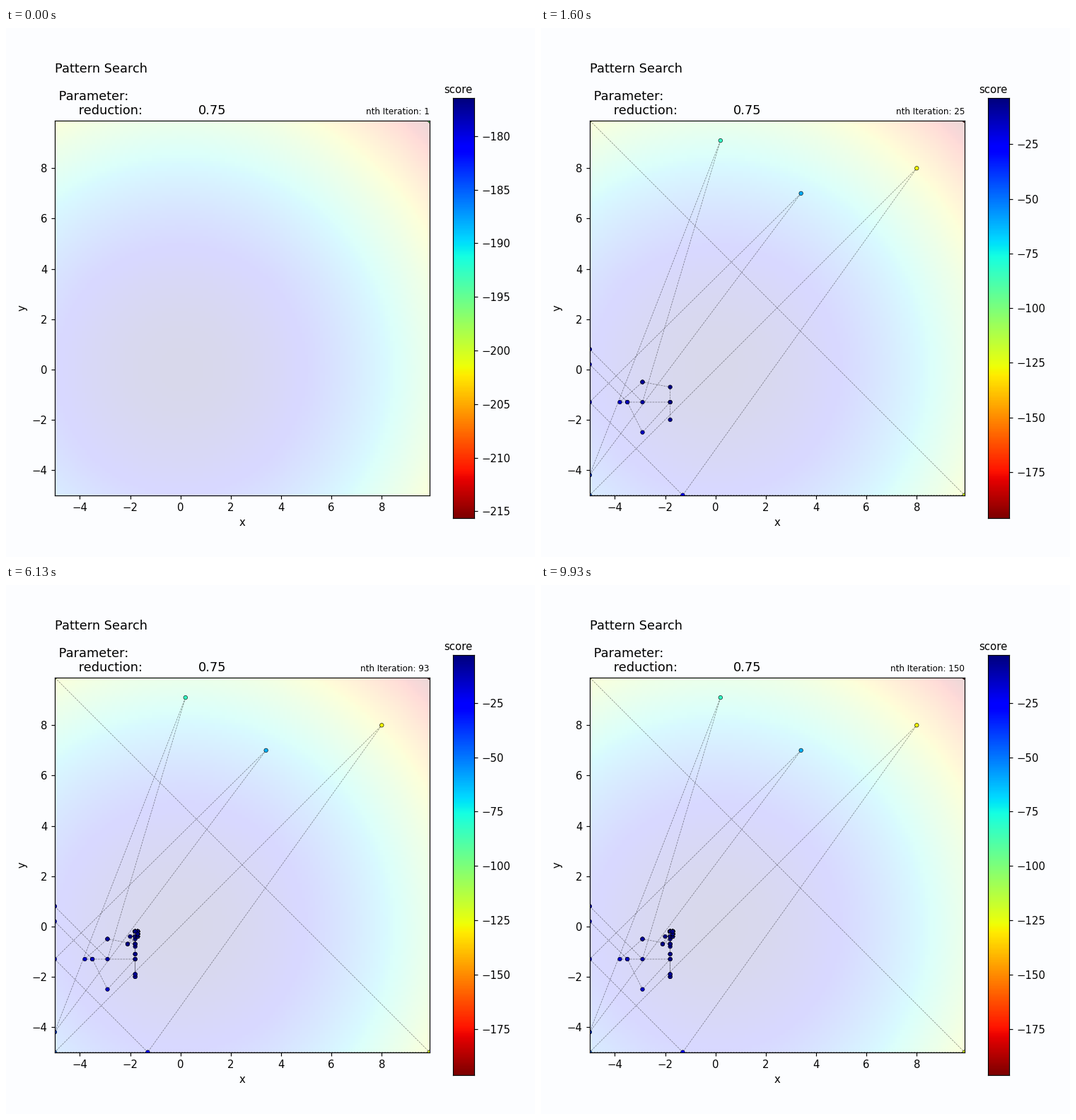
Animation of 748x748 px, one loop 9990 ms. Source, as a matplotlib script:

```python
import random

import matplotlib.pyplot as plt
import numpy as np
from matplotlib.animation import FuncAnimation

SIZE = 748
STEPS = 150
LOOP_MS = 9990
HOLD = 129          # step that stays for two ticks
CELLS = 150         # search grid, 0.1 apart
LOW, HIGH = -5, 9.9
REDUCTION = 0.75
PAPER = "#fcfdff"
CMAP = plt.get_cmap("jet_r")
MOVES = {"l": (-1, 0), "r": (1, 0), "d": (0, -1), "u": (0, 1)}


def to_xy(cells):
    return np.asarray(cells) * 0.1 + LOW


def score(cell):
    return -(to_xy(cell) ** 2).sum()


def search_path():
    """Pattern search: probe around the best cell with a shrinking reach."""
    last = CELLS - 1
    path = [(last, last), (0, last), (last, 0), (0, 0), (130, 130)]
    strays = [(84, 120), (52, 141)]
    turns = "ru dd ru ur dr lu ud ud ud ul ud lr rd".split()
    rng = random.Random(4)
    reach = CELLS / 4
    while len(path) < STEPS:
        # the newest probes are not judged yet; the latest of equals wins
        known = path[:max(7, len(path) - 3)]
        bx, by = max(reversed(known), key=score)
        for turn in turns.pop(0) if turns else rng.sample("lrdu", 2):
            dx, dy = MOVES[turn]
            probe = np.clip([bx + dx * reach, by + dy * reach], 0, last)
            path.append(tuple(probe.astype(int)))
        path.append(strays.pop(0) if strays else path[-1])
        reach *= REDUCTION
    return path[:STEPS]


def add_axes(left, top, right, bottom):
    """Axes placed by pixel edges measured from the top left."""
    return fig.add_axes([left / SIZE, 1 - bottom / SIZE,
                         (right - left) / SIZE, (bottom - top) / SIZE])


def pixel_text(x, y, text, **style):
    return fig.text(x / SIZE, 1 - y / SIZE, text, va="baseline", **style)


cells = search_path()
points = to_xy(cells)
scores = np.array([score(c) for c in cells])

plt.rcParams["font.family"] = "DejaVu Sans"
fig = plt.figure(figsize=(7, 7), dpi=SIZE / 7, facecolor=PAPER)

# Faint score landscape
ax = add_axes(68.8, 130.7, 598.9, 660.6)
grid = np.linspace(LOW, HIGH, CELLS)
height = grid[:, None] ** 2 + grid[None, :] ** 2
tint = 0.85 + 0.15 * CMAP(1 - height / height.max())[..., :3]
ax.imshow(tint, origin="lower", extent=(LOW, HIGH, LOW, HIGH),
          aspect="auto", interpolation="nearest")
ax.set_xlim(LOW, HIGH)
ax.set_ylim(LOW, HIGH)
ax.set_xlabel("x")
ax.set_ylabel("y")
counter = ax.set_title("", loc="right", fontsize=8)

heading = ["Pattern Search", "", " Parameter:", "      reduction:"]
for row, line in enumerate(heading):
    pixel_text(69, 62.8 + 19.75 * row, line, fontsize=12)
pixel_text(272, 122, str(REDUCTION), fontsize=12)

trail, = ax.plot([], [], "--", color="black", lw=0.5, alpha=0.45, zorder=2)
dots = ax.scatter([], [], s=14, c=[], cmap=CMAP, edgecolors="black",
                  linewidths=0.4, zorder=2.2)

# Score scale
bar = add_axes(631.9, 98.7, 662, 692.7)
ramp = bar.imshow(np.linspace(0, 1, 256)[:, None], cmap=CMAP, origin="lower",
                  extent=(0, 1, 0, 1), aspect="auto")
bar.set_xticks([])
bar.yaxis.tick_right()
pixel_text(639, 92.5, "score", fontsize=10, ha="center")


def update(tick):
    step = tick - (tick > HOLD)
    seen, values = points[:step + 1], scores[:step + 1]
    low, high = values.min(), values.max()
    if low == high:
        low, high = low * 1.1, high * 0.9
    trail.set_data(seen[:, 0], seen[:, 1])
    dots.set_offsets(seen)
    dots.set_array(values)
    dots.set_clim(low, high)
    ramp.set_extent((0, 1, low, high))
    bar.set_ylim(low, high)
    counter.set_text(f"nth Iteration: {step + 1}")
    return trail, dots, ramp, counter


TICKS = STEPS + 1
anim = FuncAnimation(fig, update, frames=TICKS, interval=LOOP_MS / TICKS,
                     init_func=lambda: update(0), repeat=True, repeat_delay=0)
plt.show()
```
